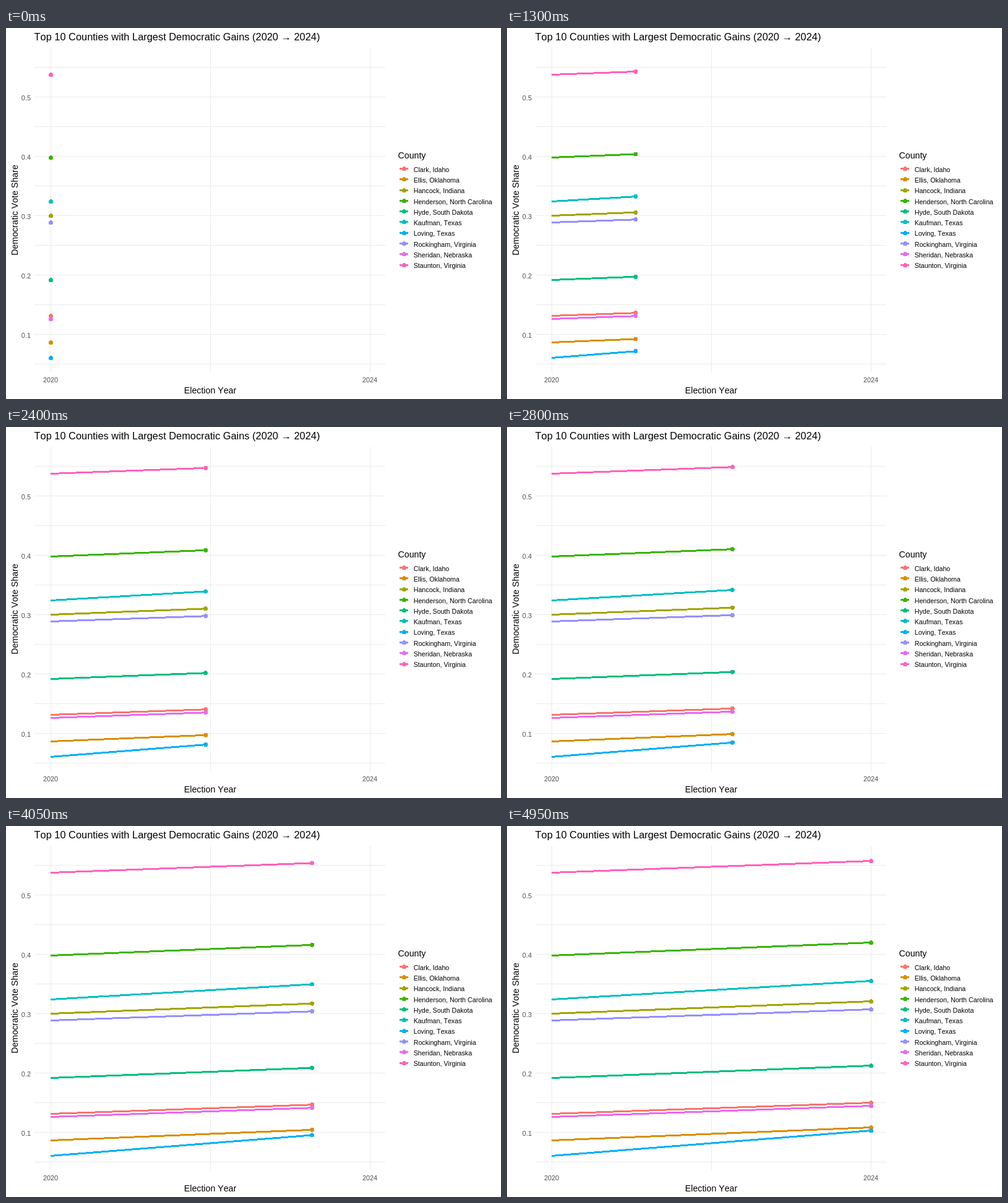
Recreate the animation shown at these times as an HTML page. Size 800x600 px, loop 5 s.

```html
<!DOCTYPE html>
<html lang="en">
<head>
<meta charset="utf-8">
<title>Democratic Gains by County</title>
<style>
  html, body { margin: 0; width: 100%; height: 100%; overflow: hidden; background: #fff; }
  svg { display: block; width: 100%; height: 100%; }
  text { font-family: "Liberation Sans", Arial, sans-serif; font-kerning: none; }
  line, circle { shape-rendering: crispEdges; }
  .grid line { stroke: #ebebeb; stroke-width: 1; }
  .series line, .legend line { stroke-width: 3; }
  .tick { font-size: 10.9px; fill: #4d4d4d; }
  .label { font-size: 14.2px; }
  .key { font-size: 10.7px; }
</style>
</head>
<body>
<svg id="chart" viewBox="0 0 800 600"></svg>
<script>
const LOOP = 5000, STEP = 50, LAST = LOOP / STEP - 1;
const X0 = 72.5, X1 = 588.5, RADIUS = 3.5;

// name, colour, y in 2020, y in 2024
const counties = [
  ["Clark, Idaho", "#f8766d", 465.5, 447.5],
  ["Ellis, Oklahoma", "#d89000", 508.5, 487.5],
  ["Hancock, Indiana", "#a3a500", 303.5, 283.5],
  ["Henderson, North Carolina", "#39b600", 209.5, 188.5],
  ["Hyde, South Dakota", "#00bf7d", 407.5, 387.5],
  ["Kaufman, Texas", "#00bfc4", 280.5, 250.5],
  ["Loving, Texas", "#00b0f6", 533.5, 492.5],
  ["Rockingham, Virginia", "#9590ff", 314.5, 296.5],
  ["Sheridan, Nebraska", "#e76bf3", 470.5, 452.5],
  ["Staunton, Virginia", "#ff62bc", 75.5, 56.5]
];

const svg = document.getElementById("chart");

function add(parent, tag, attrs, content) {
  const el = document.createElementNS("http://www.w3.org/2000/svg", tag);
  set(el, attrs);
  if (content) el.textContent = content;
  parent.appendChild(el);
  return el;
}

function set(el, attrs) {
  for (const name in attrs) el.setAttribute(name, attrs[name]);
}

const group = name => add(svg, "g", { class: name });
const line = (parent, x1, y1, x2, y2, stroke) =>
  add(parent, "line", stroke ? { x1, y1, x2, y2, stroke } : { x1, y1, x2, y2 });
const dot = (parent, cx, cy, fill) => add(parent, "circle", { cx, cy, r: RADIUS, fill });
const text = (x, y, content, attrs) => add(svg, "text", { x, y, ...attrs }, content);

const grid = group("grid");
for (let i = 0; i < 11; i++) line(grid, 46, 63.5 + 48 * i, 613, 63.5 + 48 * i);
for (const x of [X0, 330.5, X1]) line(grid, x, 32, x, 557);

const series = group("series");
const trails = counties.map(([, color, y]) => line(series, 72, y, 72, y, color));
const heads = counties.map(([, color, y]) => dot(series, X0, y, color));

text(45.5, 20, "Top 10 Counties with Largest Democratic Gains (2020 \u2192 2024)", { "font-size": 16.4 });
for (let i = 1; i <= 5; i++)
  text(40, 596.5 - 95.9 * i + 0.2, "0." + i, { class: "tick", "text-anchor": "end" });
text(72, 573, "2020", { class: "tick", "text-anchor": "middle" });
text(588, 573, "2024", { class: "tick", "text-anchor": "middle" });
text(330, 591, "Election Year", { class: "label", "text-anchor": "middle" });
text(0, 0, "Democratic Vote Share", {
  class: "label", "text-anchor": "middle", transform: "translate(19 294.5) rotate(-90)"
});

const legend = group("legend");
text(633.5, 211, "County", { class: "label" });
counties.forEach(([name, color], i) => {
  const y = Math.round(227 + 17.28 * i) + 0.5;
  line(legend, 636, y, 650, y, color);
  dot(legend, 643.5, y, color);
  text(658.7, Math.round(232.8 + 17.28 * i), name, { class: "key" });
});

function draw(time) {
  const p = Math.floor((time % LOOP) / STEP) / LAST;
  const x = X0 + (X1 - X0) * p;
  counties.forEach(([, , from, to], i) => {
    const y = from + (to - from) * p;
    set(trails[i], { x2: x, y2: y });
    set(heads[i], { cx: x, cy: y });
  });
}

let start;
function tick(now) {
  if (start === undefined) start = now;
  draw(now - start);
  requestAnimationFrame(tick);
}
draw(0);
requestAnimationFrame(tick);
</script>
</body>
</html>
```
